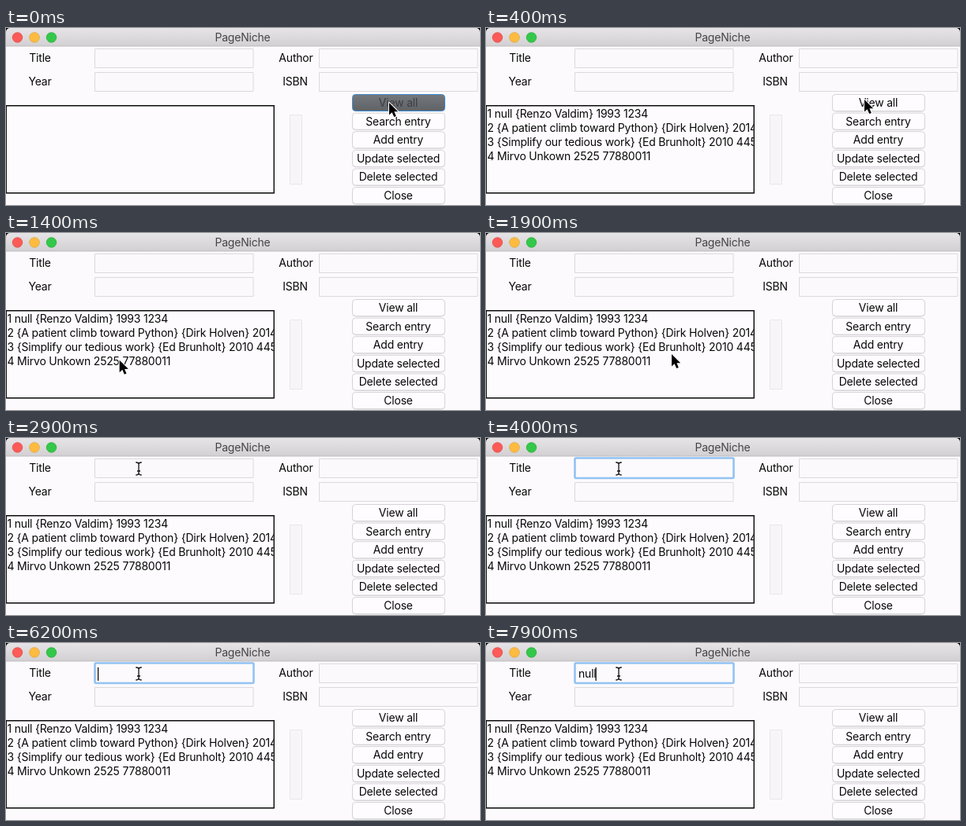
Write an HTML page with a canvas that moves like this. It is 600 by 225 pixels and loops after 8000 ms.

```html
<!DOCTYPE html>
<html lang="en">
<head>
<meta charset="utf-8">
<title>PageNiche</title>
<style>
html, body { margin: 0; width: 100%; height: 100%; overflow: hidden; background: #fcfafc; }
canvas { display: block; width: 100vw; height: 100vh; }
</style>
</head>
<body>
<canvas id="stage"></canvas>
<script>
const W = 600, H = 225, LOOP = 8000, STEP = 100;
const canvas = document.getElementById('stage');
const ctx = canvas.getContext('2d');
const scale = Math.max(1, window.devicePixelRatio || 1);
canvas.width = W * scale;
canvas.height = H * scale;

const FONT = '14px Inter, "Liberation Sans", sans-serif';
const BUTTONS = ['View all', 'Search entry', 'Add entry', 'Update selected', 'Delete selected', 'Close'];
const ROWS = [
  '1 null {Renzo Valdim} 1993 1234',
  '2 {A patient climb toward Python} {Dirk Holven} 2014 1122',
  '3 {Simplify our tedious work} {Ed Brunholt} 2010 4455',
  '4 Mirvo Unkown 2525 77880011'
];
const FIELDS = [
  { label: 'Title', lx: 43, x: 113, y: 26 },
  { label: 'Author', lx: 367, x: 397, y: 26 },
  { label: 'Year', lx: 43, x: 113, y: 56 },
  { label: 'ISBN', lx: 366, x: 397, y: 56 }
];
// Pointer path: time, x, y
const PATH = [
  [300, 485, 95], [400, 479, 91], [500, 445, 79], [600, 365, 57],
  [700, 230, 105], [800, 135, 160], [900, 113, 171], [1000, 103, 169],
  [1200, 111, 165], [1500, 160, 160], [1900, 235, 154], [2100, 241, 153],
  [2400, 241, 153], [2500, 237, 146], [2600, 224, 115], [2700, 197, 72],
  [2800, 175, 46], [2900, 168, 39]
];
const FOCUS = 3400, TYPE_START = 6300, TYPE_GAP = 200;
const clamp = v => Math.max(0, Math.min(1, v));

function pointer(t) {
  const i = PATH.findIndex(p => p[0] >= t);
  if (i === 0) return PATH[0].slice(1);
  if (i < 0) return PATH[PATH.length - 1].slice(1);
  const a = PATH[i - 1], b = PATH[i], k = (t - a[0]) / (b[0] - a[0]);
  return [a[1] + (b[1] - a[1]) * k, a[2] + (b[2] - a[2]) * k];
}

function text(str, x, y, align = 'left', color = '#080808') {
  ctx.font = FONT;
  ctx.letterSpacing = '-0.2px';
  ctx.textAlign = align;
  ctx.fillStyle = color;
  ctx.fillText(str, x, y);
}

function box(x, y, w, h, r, fill, stroke, line = 1) {
  ctx.beginPath();
  ctx.roundRect(x, y, w, h, r);
  if (fill) { ctx.fillStyle = fill; ctx.fill(); }
  if (stroke) { ctx.strokeStyle = stroke; ctx.lineWidth = line; ctx.stroke(); }
}

function gradient(y0, y1, a, b) {
  const g = ctx.createLinearGradient(0, y0, 0, y1);
  g.addColorStop(0, a);
  g.addColorStop(1, b);
  return g;
}

function titleBar() {
  ctx.fillStyle = '#000';
  ctx.fillRect(0, 0, W, 8);
  box(0, 0, W, 23, [5, 5, 0, 0], gradient(0, 23, '#e6e4e6', '#d2d0d2'));
  ctx.fillStyle = '#bdbbbd';
  ctx.fillRect(0, 22.5, W, 1);
  [['#fc5b57', '#df4744'], ['#fdbc40', '#de9f34'], ['#34c84a', '#27aa35']].forEach(([fill, edge], i) => {
    ctx.beginPath();
    ctx.arc(14.5 + i * 21.5, 12, 6.3, 0, Math.PI * 2);
    ctx.fillStyle = fill;
    ctx.fill();
    ctx.strokeStyle = edge;
    ctx.lineWidth = 0.7;
    ctx.stroke();
  });
  text('PageNiche', 299.5, 17, 'center', '#464446');
}

function fields(t) {
  FIELDS.forEach(f => {
    text(f.label, f.lx, f.y + 17, 'center');
    box(f.x - 0.5, f.y + 0.5, 200.5, 24, 0, '#fbf9fb', '#dbd9db');
  });
  const glow = clamp((t - FOCUS + STEP) / 400);
  if (!glow) return;
  ctx.globalAlpha = glow;
  box(112.5, 25.5, 201, 25.5, 1.5, '#fcfafc', '#92c3f3', 2.6);
  ctx.globalAlpha = 1;

  const count = t < TYPE_START ? 0 : Math.floor((t - TYPE_START) / TYPE_GAP) + 1;
  const typed = 'null'.slice(0, count);
  text(typed, 117, 43.5);
  if ((t - FOCUS) % 900 < 600) {
    ctx.fillStyle = '#000';
    ctx.fillRect(116 + ctx.measureText(typed).width, 31, 1.2, 17);
  }
}

function list(t) {
  box(0.25, 98.75, 339, 111, 0, '#fdfbfd', '#0a0a0a', 1.4);
  if (t >= 100) {
    ctx.save();
    ctx.beginPath();
    ctx.rect(1, 99, 337.8, 110);
    ctx.clip();
    ROWS.forEach((row, i) => text(row, 1.5, 113.5 + i * 18.1));
    ctx.restore();
  }
  box(359.5, 110.5, 15, 88, 0, '#f7f5f7', '#e9e7e9');
}

function buttons(t) {
  BUTTONS.forEach((label, i) => {
    const y = 84.5 + i * 23.6, down = i === 0 && t < 100;
    if (down) {
      box(438.5, y, 117, 21, 4, gradient(y, y + 21, '#74797e', '#5f6265'), '#3d8bd0');
    } else {
      box(438.5, y + 0.6, 117, 21, 4, null, '#dcdadc');
      box(438.5, y, 117, 21, 4, '#fefcfe', '#d3d1d3', 0.9);
    }
    text(label, 496.5, y + 15.5, 'center', down ? '#3c3e40' : '#080808');
  });
}

function arrow() {
  ctx.beginPath();
  [[0, 0], [0, 15.5], [3.6, 12.2], [6.2, 18], [8.8, 16.9], [6.4, 11.3], [11.2, 11.2]]
    .forEach(p => ctx.lineTo(...p));
  ctx.closePath();
  ctx.lineJoin = 'round';
  ctx.strokeStyle = '#fff';
  ctx.lineWidth = 2;
  ctx.stroke();
  ctx.fillStyle = '#000';
  ctx.fill();
}

function beam() {
  ctx.beginPath();
  for (const s of [-1, 1]) {
    ctx.moveTo(-3.7, 8 * s);
    ctx.quadraticCurveTo(0, 8 * s, 0, 5.5 * s);
    ctx.quadraticCurveTo(0, 8 * s, 3.7, 8 * s);
  }
  ctx.moveTo(0, -6);
  ctx.lineTo(0, 6);
  ctx.moveTo(-2, 3);
  ctx.lineTo(2, 3);
  ctx.strokeStyle = '#111';
  ctx.lineWidth = 1.3;
  ctx.stroke();
}

function cursor(t) {
  const [x, y] = pointer(t);
  const inField = FIELDS.some(f => x > f.x && x < f.x + 200 && y > f.y && y < f.y + 24);
  ctx.save();
  ctx.translate(x, y);
  inField ? beam() : arrow();
  ctx.restore();
}

function draw(now) {
  const t = Math.floor((now % LOOP) / STEP) * STEP;
  ctx.setTransform(scale, 0, 0, scale, 0, 0);
  ctx.fillStyle = '#fcfafc';
  ctx.fillRect(0, 0, W, H);
  titleBar();
  fields(t);
  list(t);
  buttons(t);
  cursor(t);
}

const start = performance.now();
function frame() {
  draw(performance.now() - start);
  requestAnimationFrame(frame);
}
frame();
</script>
</body>
</html>
```
